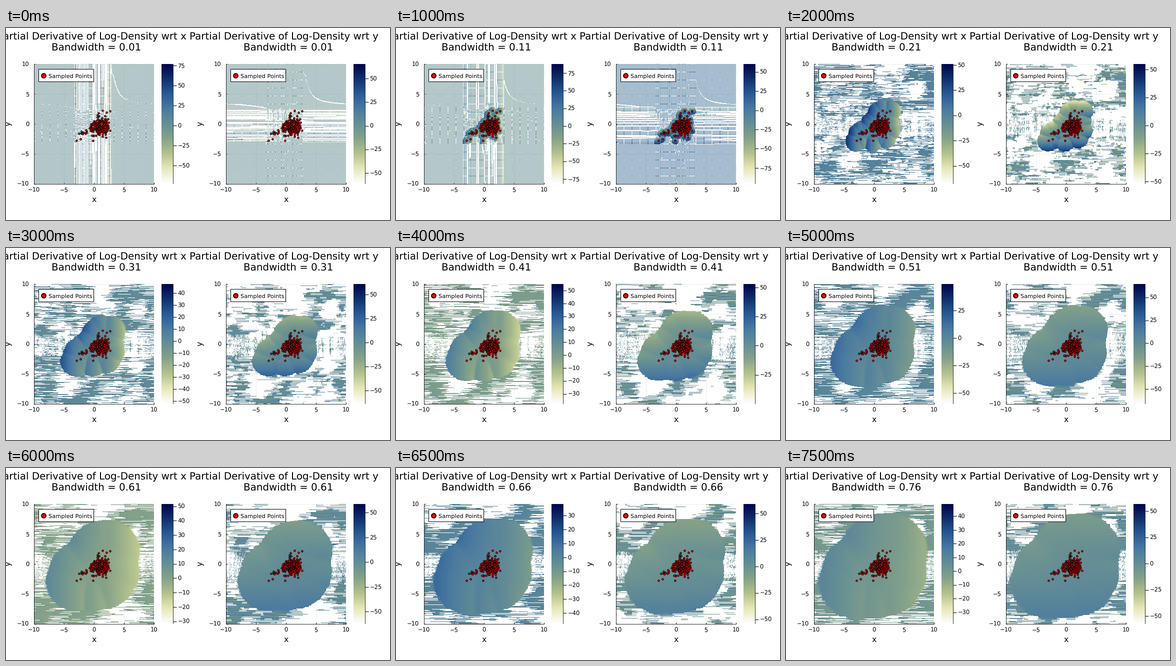
Animation, 768 px wide and 384 px high, one loop 8000 ms. Source, as a matplotlib script:

```python
import numpy as np
import matplotlib.pyplot as plt
from matplotlib.animation import FuncAnimation
from matplotlib.colors import LinearSegmentedColormap
from matplotlib.patches import Rectangle
from matplotlib.ticker import MultipleLocator

W, H, DPI = 768, 384, 72
FRAMES, STEP = 16, 500
N = 256
SMALL, GUIDE, TITLE = 11.5, 15.7, 19.9

plt.rcParams["font.family"] = "DejaVu Sans"
plt.rcParams["text.hinting"] = "none"
DAVOS = ["#fefefe", "#e6e7b9", "#b4c28d", "#85a289", "#658e95",
         "#4a7aa0", "#2a5a94", "#11326d", "#00054a"]
cmap = LinearSegmentedColormap.from_list("davos_r", DAVOS)
cmap.set_bad((0, 0, 0, 0))


def sample_points():
    """A correlated cloud with an arm to the lower left and a few outliers."""
    rng = np.random.default_rng(12)
    core = rng.multivariate_normal((.95, -.6), [[.55, .12], [.12, .95]], 500)
    x, y = core.T
    inside = (x < 2.5) & (y > -2.3) & (y < 1.9) & (y < 1.1 + 1.2 * x) & (x > -.7)
    t = rng.random(16)
    arm = np.column_stack([-2.1 + 2 * t, -1.7 + .9 * t + rng.normal(0, .2, 16)])
    tips = [(-2.97, -2.8), (-2.28, -2.5), (-.17, -2.8), (-2.55, -1.63),
            (1.38, 2.22), (2.68, 2.13), (.72, 1.8), (2.05, 1.88),
            (2.3, .8), (2.63, -1.13), (1.97, -2.3)]
    return np.vstack([tips, arm, core[inside][:180]])


points = sample_points()
dx = 20 / (N - 1)


def binned(pts):
    """Bilinear weights of the points on the grid, rows along y."""
    grid = np.zeros((N, N))
    pos = (pts + 10) / dx
    cell = pos.astype(int)
    fx, fy = (pos - cell).T
    for ox, wx in ((0, 1 - fx), (1, fx)):
        for oy, wy in ((0, 1 - fy), (1, fy)):
            np.add.at(grid, (cell[:, 1] + oy, cell[:, 0] + ox), wx * wy)
    return grid / len(pts)


spectrum = np.fft.rfft2(binned(points))
kx = 2 * np.pi * np.fft.rfftfreq(N, dx)
ky = 2 * np.pi * np.fft.fftfreq(N, dx)


def log_gradient(h):
    """Central differences of the log of an FFT density estimate.

    Ringing and rounding make the density negative in places; those stay blank.
    """
    kernel = np.exp(-h * h * (ky[:, None] ** 2 + kx ** 2) / 2)
    p = np.fft.irfft2(spectrum * kernel, s=(N, N))
    logp = np.log(np.where(p > 0, p, np.nan))
    gx, gy = np.full((2, N, N), np.nan)
    gx[:, 1:-1] = (logp[:, 2:] - logp[:, :-2]) / (2 * dx)
    gy[1:-1] = (logp[2:] - logp[:-2]) / (2 * dx)
    return gx, gy


fig = plt.figure(figsize=(W / DPI, H / DPI), dpi=DPI, facecolor="white")


def pixel_axes(left, top, width, height):
    return fig.add_axes([left / W, 1 - (top + height) / H, width / W, height / H])


def label(x, y, s, size, **kw):
    return fig.text(x / W, 1 - y / H, s, size=size, ha="center", **kw)


class Panel:
    def __init__(self, x0, name):
        ax = pixel_axes(x0 + 56.4, 72, 239.4, 239.6)
        half = 10 + dx / 2
        self.image = ax.imshow(np.zeros((N, N)), cmap=cmap, origin="lower",
                               extent=(-half, half, -half, half),
                               interpolation="nearest", aspect="auto", zorder=2)
        ax.set(xlim=(-10, 10), ylim=(-10, 10))
        for axis in (ax.xaxis, ax.yaxis):
            axis.set_major_locator(MultipleLocator(5))
        ax.set_axisbelow(True)
        ax.grid(color="black", alpha=.1, lw=.7)
        ax.tick_params(direction="in", length=3, width=1, labelsize=SMALL)
        ax.tick_params(axis="x", pad=7.5)
        ax.tick_params(axis="y", pad=10)
        ax.spines[["top", "right"]].set_visible(False)
        ax.scatter(*points.T, s=12, c="red", edgecolors="black", lw=1, zorder=4)

        key = pixel_axes(x0, 0, 384, 384)
        key.set(xlim=(0, 384), ylim=(384, 0))
        key.axis("off")
        key.add_patch(Rectangle((65, 82.2), 110, 25, fc="white", ec="black", lw=1))
        key.plot(75.3, 95, "o", ms=9, mfc="red", mec="black", mew=1.7)
        key.text(85.3, 99.3, "Sampled Points", size=SMALL - .1, va="baseline")

        self.bar = pixel_axes(x0 + 311, 72, 23, 239)
        ramp = np.linspace(0, 1, 256)[:, None]
        self.ramp = self.bar.imshow(ramp, cmap=cmap, origin="lower", aspect="auto")
        self.bar.set_xticks([])
        self.bar.yaxis.tick_right()
        self.bar.tick_params(axis="y", length=6.5, width=1, pad=3, labelsize=SMALL)
        self.bar.spines[["top", "bottom", "left"]].set_visible(False)

        label(x0 + 172.3, 23, f"Partial Derivative of Log-Density wrt {name}", TITLE)
        self.title = label(x0 + 180.3, 44.5, "", TITLE)
        label(x0 + 176.5, 348, "x", GUIDE)
        label(x0 + 5.2, 191.5, "y", GUIDE, rotation=90, va="center")

    def show(self, h, field):
        low, high = np.nanmin(field), np.nanmax(field)
        self.image.set_data(np.ma.masked_invalid(field))
        self.image.set_clim(low, high)
        self.ramp.set_extent((0, 1, low, high))
        self.bar.set_ylim(low, high)
        self.bar.yaxis.set_major_locator(MultipleLocator(10 if high - low < 100 else 25))
        self.title.set_text(f"Bandwidth = {h:.2f}")


panels = [Panel(0, "x"), Panel(384, "y")]


def draw(k):
    h = .01 + .05 * k
    for panel, field in zip(panels, log_gradient(h)):
        panel.show(h, field)
    return []


anim = FuncAnimation(fig, draw, frames=FRAMES, interval=STEP, repeat=True,
                     repeat_delay=0, blit=False)
plt.show()
```
